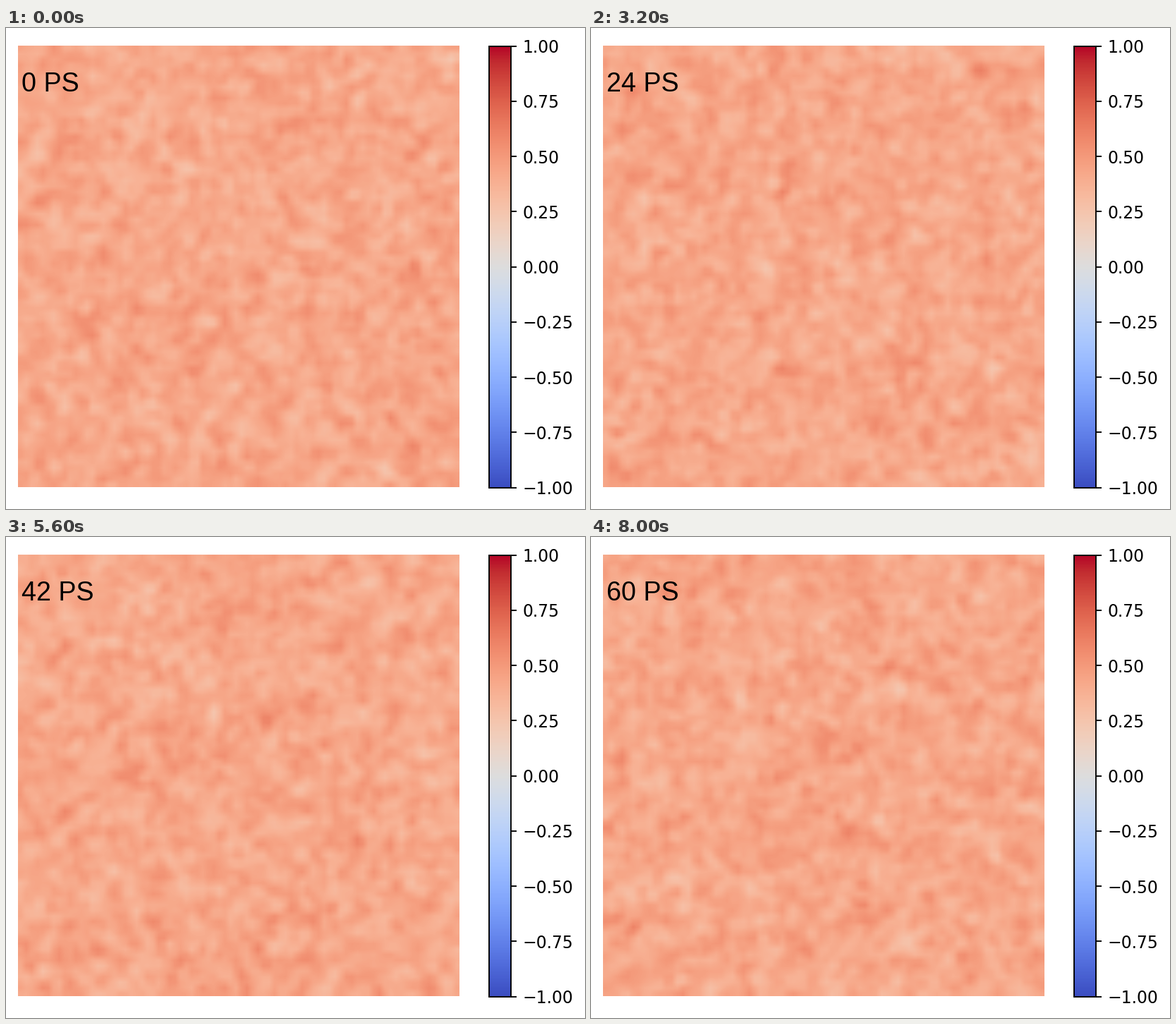
Animation of 821x682 px, one loop 8.8 s. Source, as a matplotlib script:

```python
import numpy as np
import matplotlib.pyplot as plt
from matplotlib.animation import FuncAnimation

W, H, DPI = 821, 682, 128
K = 169.4 / DPI          # scale of the default point sizes
N = 80                   # cells per side
MEAN, STD = 0.425, 0.05
STEP, FRAMES = 6, 11     # picoseconds per frame, frames per loop


def field(time, sigma=0.8):
    """Periodic, lightly smoothed Gaussian noise around MEAN."""
    raw = np.random.default_rng(time).normal(size=(N, N))
    f = np.fft.fftfreq(N)
    low = np.exp(-2 * (np.pi * sigma) ** 2 * (f[:, None] ** 2 + f ** 2))
    z = np.fft.ifft2(np.fft.fft2(raw) * low).real
    return MEAN + STD * (z - z.mean()) / z.std()


def px_axes(x, y, w, h):
    return fig.add_axes([x / W, 1 - (y + h) / H, w / W, h / H])


plt.rcParams["font.family"] = "DejaVu Sans"
fig = plt.figure(figsize=(W / DPI, H / DPI), dpi=DPI, facecolor="white")

ax = px_axes(17, 25, 626, 626)
ax.axis("off")
image = ax.imshow(field(0), cmap="coolwarm", vmin=-1, vmax=1,
                  interpolation="bilinear", aspect="auto")

cax = px_axes(685, 25.6, 31.3, 626)
bar = fig.colorbar(image, cax=cax, ticks=np.linspace(-1, 1, 9))
bar.outline.set_linewidth(0.8 * K)
cax.tick_params(labelsize=10 * K, length=3.5 * K, width=0.8 * K, pad=3.5 * K)

label = fig.text(21.8 / W, 1 - 90.5 / H, "", family="Liberation Sans",
                 size=16 * K, va="baseline", ha="left")


def update(i):
    time = STEP * i
    image.set_data(field(time))
    label.set_text(f"{time} PS")
    return image, label


anim = FuncAnimation(fig, update, frames=FRAMES, interval=800,
                     repeat=True, repeat_delay=0, blit=False)
plt.show()
```
